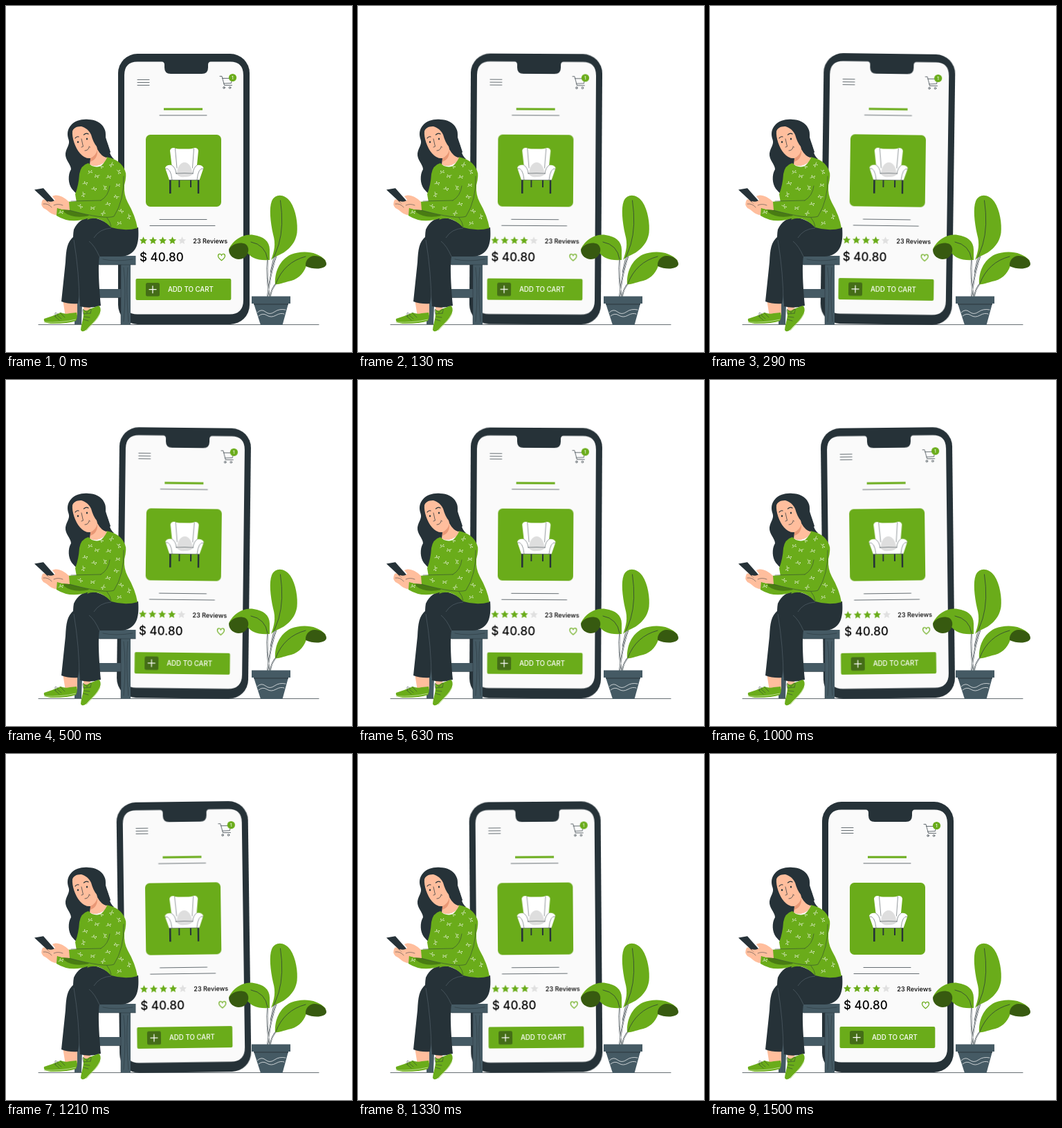
An HTML page that plays this animation: 500 px wide and 500 px high, repeating every 1540 ms.

```html
<!DOCTYPE html>
<html lang="en">
<head>
<meta charset="utf-8">
<title>Add to cart</title>
<style>
  html, body { margin: 0; width: 100%; height: 100%; overflow: hidden; background: #fff; }
  svg { display: block; width: 100%; height: 100%; }
  text { font-family: Inter, "Open Sans", sans-serif; font-weight: 450; }
  .dark { fill: #263238; }
  .green { fill: #6aac1a; }
  .deep { fill: #375a10; }
  .slate { fill: #455a64; }
  .skin { fill: #ffbe9d; }
  .line { fill: none; stroke: #263238; stroke-width: .7; stroke-linecap: round; stroke-linejoin: round; }
  .fine { stroke-width: .5; }
  .pale { fill: none; stroke: #fff; stroke-width: .7; stroke-linecap: round; }
  .seam { fill: none; stroke: #62717a; stroke-width: .5; }
  .sole { fill: none; stroke: #b9dc8b; stroke-width: 1; }
  #phone { transform-origin: 257px 264.7px; animation: sway 1540ms linear infinite; }
  @keyframes sway {
    0%, 97.4%, 100% { transform: rotate(0deg); }
    24.35% { transform: rotate(1deg); }
    73.05% { transform: rotate(-1deg); }
  }
</style>
</head>
<body>
<svg viewBox="0 0 500 500">
  <defs>
    <path id="star" d="M0-5.7 1.7-2 5.6-1.6 2.7 1.1 3.5 5 0 3-3.5 5-2.7 1.1-5.6-1.6-1.7-2Z"/>
    <g id="sprig">
      <path class="pale" d="M-4 4Q0 1 4-3M-1 2-2-2M1 0 5 1"/>
      <g fill="#fff"><circle cx="-2" cy="-2.4" r="1"/><circle cx="4.4" cy="-3.2" r="1"/><circle cx="5" cy="1" r=".9"/></g>
    </g>
    <path id="stems" d="M397 345Q383 375 378 420M378 364Q376 395 381 420M391 400Q383 409 382 420" fill="none"/>
  </defs>

  <path class="line" d="M47 460.5H452"/>

  <g id="phone">
    <rect class="dark" x="162" y="69" width="190" height="391" rx="28"/>
    <path fill="#fafafa" d="M190 80.5H225Q229 80.5 229 85V89Q229 98 238 98H283Q292 98 292 89V85Q292 80.5 296 80.5H324Q343 80.5 343 100V425Q343 445.5 323 445.5H190Q171 445.5 171 425V100Q171 80.5 190 80.5Z"/>

    <path class="line" d="M190 106.5H207M190 110.5H207M190 114.5H207"/>
    <path class="line" d="M309 101.5H312L315.5 114.5H326.5M312.8 104.5H326.5L325.5 111.5 314.8 112"/>
    <g class="line"><circle cx="315" cy="118" r="1.3"/><circle cx="323.5" cy="118" r="1.3"/></g>
    <circle class="green" cx="327.5" cy="103.5" r="5.6"/>
    <text x="327.3" y="106" font-size="6.5" text-anchor="middle" fill="#fff">1</text>

    <rect class="green" x="228" y="147.5" width="56" height="3"/>
    <path class="line" d="M222 158H290M222 308.5H290M208 317.5H302"/>

    <rect class="green" x="202" y="186" width="109" height="104" rx="6.5"/>
    <path class="dark" d="M236 250H238.6V271H236ZM249.5 250H251.3V262H249.5ZM266 250H268V262H266ZM276.8 250H279.2V271H276.8Z"/>
    <path fill="#fff" d="M237 209Q238 204.5 243 205Q247 207 257 206.5Q268 207 272 205Q277 204.5 278 209L276 230Q283 229 285.5 234L279.5 251.5H236L230 234Q232 229 239.5 230Z"/>
    <path class="line fine" d="M244.5 206 247 234M271.5 206 269.5 234M239.5 230Q245 233 246 242M276 230Q271 233 270 242M230.5 235Q238 233 240 251M285 235Q278 233 276 251M246 242H270M236 251.5H279"/>
    <path fill="#dedede" d="M247 243C247 233 252 226 258 226S269 233 269.5 243Q266 247.5 258 247Q250 248 247 243Z"/>
    <path class="line fine" d="M246 242Q258 241 270 242"/>

    <g class="green">
      <use href="#star" x="198.5" y="339"/>
      <use href="#star" x="212.5" y="339"/>
      <use href="#star" x="226.5" y="339"/>
      <use href="#star" x="240.5" y="339"/>
    </g>
    <use href="#star" x="254.5" y="339" fill="#e0e0e0"/>
    <text x="270.3" y="342.5" font-size="9.1">23 Reviews</text>
    <text x="193" y="369" font-size="17">$ 40.80</text>
    <path d="M311.5 367.8C308 365 306.5 363 306.5 361.2C306.5 357.6 310.3 357.4 311.5 360.2C312.7 357.4 316.5 357.6 316.5 361.2C316.5 363 315 365 311.5 367.8Z" fill="none" stroke="#6aac1a" stroke-width="1.2"/>

    <rect class="green" x="187.5" y="394" width="137.8" height="31" rx="2"/>
    <rect fill="#446d17" x="202" y="400" width="20" height="19.5" rx="2.5"/>
    <path d="M206.5 409.7H217.5M212 404.2V415.2" stroke="#fff" stroke-width="1.2"/>
    <text x="234" y="413.2" font-size="9.7" fill="#fff">ADD TO CART</text>
  </g>

  <g id="plant">
    <use href="#stems" stroke="#263238" stroke-width="1.8"/>
    <use href="#stems" stroke="#fff" stroke-width=".8"/>
    <path class="green" d="M383 367C388 354 390 344 386 330C382 312 380 292 384 282C389 271 402 271 411 283C419 295 422 315 420.5 328C418 345 405 356 392 361C388 363 386 364 383 367Z"/>
    <path class="green" d="M322 352C326 341 341 328 358 331C372 333 381 340 381 352V367C362 368 355 364 348 356C343 346 330 342 322 352Z"/>
    <path class="deep" d="M322 352C322 364 335 369 344 364C352 358 352 348 346 344C338 340 326 344 322 352Z"/>
    <path class="green" d="M389 402C388 385 395 367 412 359C428 353 450 354 462 368L434 375C430 388 420 396 408 398C400 400 394 403 389 402Z"/>
    <path class="deep" d="M433 376C432 368 438 361 446 361C455 361 463 366 463 373C462 380 446 382 433 376Z"/>
    <path class="line" d="M396.5 281Q402 318 394 345Q385 365 382 385M354 341Q375 345 378 366M433 362Q402 370 390 401"/>
    <path class="slate" d="M358 430H408L399.5 461H368Z"/>
    <path fill="#37474f" d="M358 430H408L407.6 432H358.5Z"/>
    <rect class="slate" x="355" y="419.5" width="56" height="10.5"/>
    <path class="pale" d="M363 443Q369 437 375 442T388 442T404 439M365 448Q371 443 377 447T390 447T402 445"/>
  </g>

  <g id="stool">
    <path class="slate" d="M101 374H112L109 460H99ZM125 409H168V421.5H125ZM166 373H180V460.5H166ZM104 361H187.5V374H104Z"/>
    <path class="line fine" d="M135 374H187M166 374V460M136 421.5H166M170 378Q174 410 170 456M176 378Q173 410 177 456M140 366Q158 370 183 366"/>
  </g>

  <g id="woman">
    <path class="dark" d="M119 164C109 163 100 166 95 171C88 178 88 186 90.5 193C93 200 87 205 86 213C85 222 94 229 94 236C89 244 90 257 95 264Q99 269 103 272L110 240 130 222 156 221C148 215 150 205 146 198C142 191 146 184 142 177C138 168 128 164 119 164Z"/>

    <path class="skin" d="M82 424H103V447L86 449ZM111 430H123L121 443H113Z"/>
    <path class="green" d="M55 452Q68 448 79 443Q86 446 92 444L102 443Q104 449 101 455Q90 459 68 459Q53 459 55 452Z"/>
    <path class="sole" d="M55 457Q80 458 101 453"/>
    <path class="line fine" d="M73 446 80 452M78 443 85 450M70 448 77 454M76 446Q68 439 72 449"/>
    <path class="dark" d="M98 333C88 341 87 352 86 370L80 427Q91 431 104 430L112 380Z"/>
    <path class="dark" d="M152 319C134 302 108 300 98 323C94 345 103 382 107 434Q121 438 137 433C134 400 133 375 135 362H165C188 361 193 345 191 320Z"/>
    <path class="seam" d="M98 338Q106 385 106 432M152 321Q135 322 127 335M135 362Q128 346 120 340"/>
    <path class="green" d="M111 437Q114 443 121 438L134 433Q138 436 136 443C132 453 124 459 117 467Q110 473 108 468C109 457 114 449 111 437Z"/>
    <path class="sole" d="M136 444C132 454 123 461 116 469"/>
    <path class="line fine" d="M112 445 122 444M113 449 121 450M112 453 119 455M117 443Q108 433 112 445M117 443Q126 432 122 444"/>

    <path class="green" d="M70 290Q88 299 121 289L120 306Q94 316 73 303Z"/>
    <path fill="#497c13" d="M83 293H123L121 303Q97 308 84 298Z"/>
    <path class="skin" d="M53 280C57 278 65 283 67 288L74 290 73 302C65 302 61 295 54 292Q49 287 53 280Z"/>
    <path class="green" d="M119 227Q108 230 106 243Q105 259 100 272L102 284 121 289Q120 306 117 309Q134 301 152 320Q172 326 190 321Q187 303 176 284Q170 273 171 259Q175 244 172 238Q166 222 145 218Q140 237 124 231Z"/>
    <path class="green" d="M88 283Q110 281 137 281L158 238Q170 239 171 254Q172 282 156 305Q145 310 91 295Z"/>
    <path class="line fine" d="M170 246Q171 281 156 304Q143 309 91 295M137 281Q148 275 150 260M94 282 137 281M146 306Q151 312 152 319"/>

    <path class="dark" d="M41 265.5 54 263.3 75 287 63 286Z"/>
    <path class="skin" d="M67 275C73 271 83 275 91 283L92 295C81 294 73 293 68 288Q61 286 60 282Q68 284 71 280Z"/>
    <path class="line fine" d="M54 286Q61 285 66 291M69 288Q75 285 82 288"/>

    <path class="skin" d="M96 181C98 173 114 170 128 183L132 207Q138 218 146 219Q141 232 126 231L121 229 122 220Q114 221 107 213C100 205 95 190 96 181Z"/>
    <path fill="#e99876" d="M122 220Q130 216 132 208Q133 221 122 225Z"/>
    <path class="dark" d="M95 182Q98 175 104 173.5C112 173 120 179 123 186Q126 197 131 203Q136 216 145 219L151 211 140 178Q126 163 109 168Q95 172 95 182Z"/>
    <g class="dark"><ellipse cx="104" cy="196.5" rx="1.1" ry="1.6"/><ellipse cx="117" cy="192" rx="1.1" ry="1.6"/></g>
    <path class="line" d="M100 191Q102 188 105 189M112.5 186Q116 183 119 185" style="stroke-width:1.2"/>
    <path class="line" d="M109 192 111.5 203 109 204M114 209Q119 209 120 204M120 203 121.5 204"/>
    <g id="sprigs"></g>
  </g>
</svg>
<script>
  // x, y, turn of each sprig on the sweater
  const spots = [
    [121, 240, 0], [137, 231, 60], [153, 229, 150], [114, 256, 30], [132, 246, 200],
    [148, 247, 20], [163, 239, 80], [112, 272, 120], [127, 264, 40], [143, 262, 100],
    [161, 259, 10], [107, 289, 60], [126, 292, 190], [147, 286, 30], [160, 276, 220],
    [166, 296, 50], [178, 304, 120], [163, 314, 0], [79, 298, 20], [141, 299, 150]
  ];
  document.getElementById("sprigs").innerHTML = spots
    .map(([x, y, a]) => `<use href="#sprig" transform="translate(${x} ${y}) rotate(${a}) scale(.62)"/>`)
    .join("");
</script>
</body>
</html>
```
